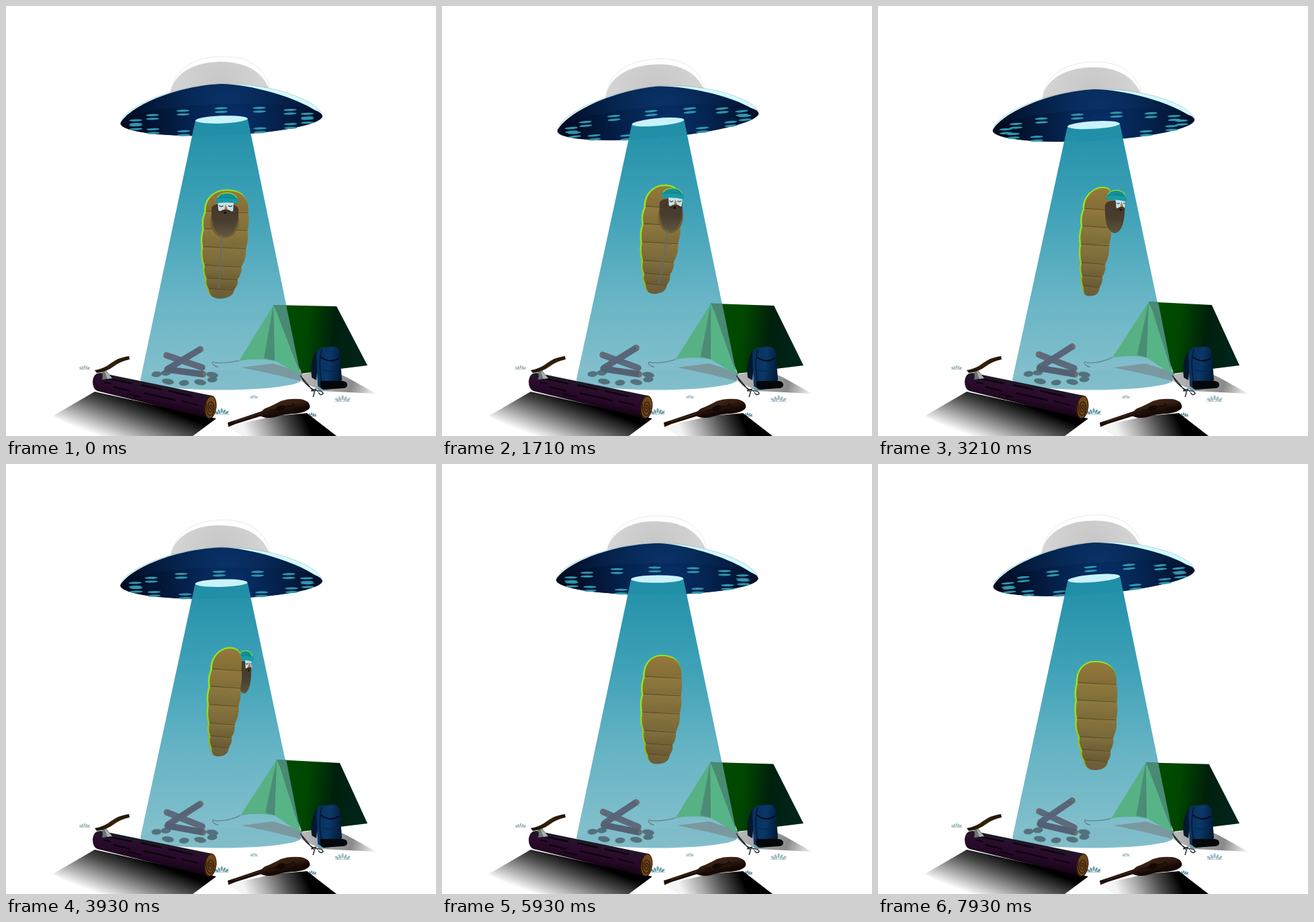
An HTML page with a canvas for the animation above (8000 ms loop, 640 by 640 pixels).

```html
<!DOCTYPE html>
<html lang="en">
<head>
<meta charset="utf-8">
<title>Camp abduction</title>
<style>
  html, body { margin: 0; width: 100%; height: 100%; overflow: hidden; background: #fff; }
  canvas { display: block; width: 640px; height: 640px; }
</style>
</head>
<body>
<canvas id="stage" width="640" height="640"></canvas>
<script>
const ctx = document.getElementById('stage').getContext('2d');
const LOOP = 8000, TAU = Math.PI * 2;

// ---------- helpers ----------
function paint(path, fill, stroke, width = 1) {
  const p = typeof path === 'string' ? new Path2D(path) : path;
  if (fill) { ctx.fillStyle = fill; ctx.fill(p); }
  if (stroke) { ctx.strokeStyle = stroke; ctx.lineWidth = width; ctx.stroke(p); }
}
function oval(x, y, rx, ry, fill, rot = 0) {
  ctx.beginPath();
  ctx.ellipse(x, y, rx, ry, rot, 0, TAU);
  ctx.fillStyle = fill;
  ctx.fill();
}
function addStops(g, colors) {
  colors.forEach((c, i) => g.addColorStop(i / (colors.length - 1), c));
  return g;
}
const linear = (x0, y0, x1, y1, ...colors) => addStops(ctx.createLinearGradient(x0, y0, x1, y1), colors);
const radial = (x, y, r, ...colors) => addStops(ctx.createRadialGradient(x, y, 0, x, y, r), colors);

// Smooth curve through values placed at the key times (seconds)
const KEY_TIMES = [0, 1, 2.5, 3.21, 4.57, 5.93, 7.93];
function track(v, t) {
  const k = KEY_TIMES, last = k.length - 1;
  let i = 0;
  while (i < last - 1 && t > k[i + 1]) i++;
  const slope = j => {
    const a = Math.max(0, j - 1), b = Math.min(last, j + 1);
    return (v[b] - v[a]) / (k[b] - k[a]);
  };
  const h = k[i + 1] - k[i], u = (t - k[i]) / h, u2 = u * u, u3 = u2 * u;
  return (2 * u3 - 3 * u2 + 1) * v[i] + (u3 - 2 * u2 + u) * h * slope(i)
       + (3 * u2 - 2 * u3) * v[i + 1] + (u3 - u2) * h * slope(i + 1);
}

// ---------- ground ----------
function tuft(x, y, s, color) {
  for (let i = -2; i <= 2; i++) {
    oval(x + i * 3.2 * s, y - (2 - Math.abs(i)) * 1.2 * s, 1.3 * s, 2.8 * s, color, i * 0.45);
  }
  ctx.fillStyle = color;
  ctx.fillRect(x - 9 * s, y + 1.5 * s, 18 * s, 0.8);
}

// The front stands in the beam, so its colours are already tinted
function tent(lift) {
  const px = 398 + 5 * lift, py = 445 - 5 * lift;
  const rx = 492 + 5 * lift, ry = 447 - 2 * lift;
  const lx = 347 + 2 * lift, ly = 528 - 5 * lift;
  const my = 526 - 5 * lift;
  paint('M438 549L480 540L508 553L551 577L470 573L440 559Z',
    linear(440, 550, 551, 577, '#b9b9b9', '#a2a2a2', '#8a8a8a', '#fafafa'));
  paint('M350 538L398 532L442 546L438 558L398 548Z', '#7a98a0');
  paint(`M${lx} ${ly}Q330 532 312 531M312 531q-6 -3 -4 2q3 4 8 4`, null, '#66838c', 1.3);
  paint(`M${px} ${py}L${lx} ${ly}Q${lx + 18} ${ly - 3} 384 ${my}L400 ${my + 2}Z`, '#57b184');
  paint(`M${px} ${py}L${384 + 2 * lift} ${my - 2}L400 ${my + 2}L${px + 2} ${py + 20}Z`, '#4b8c76');
  paint(`M${px} ${py}L${rx} ${ry}L538 535L440 547Z`, linear(410, 490, 525, 502, '#004c00', '#004600', '#00200c', '#00241a'));
  paint(`M${px} ${py}L417 ${py}L438.5 549L${px + 4} ${py + 10}Z`, '#4a8974');
  paint(`M${px} ${py}L400 ${my + 2}L438 549L${px + 6} ${py + 14}Z`, '#57b486');
}

function stick(x0, y0, x1, y1, color) {
  ctx.lineCap = 'round';
  paint(`M${x0} ${y0}L${x1} ${y1}`, null, color, 9.5);
  ctx.lineCap = 'butt';
  const a = Math.atan2(y1 - y0, x1 - x0);
  oval(x1 + 2 * Math.cos(a), y1 + 2 * Math.sin(a), 2.2, 4.2, '#706c66', a);
}

function campfire(k) {
  const stones = [[224, 548], [241, 559], [265, 561], [289, 560], [307, 556], [307, 549], [238, 546]];
  stones.forEach(([x, y], i) => oval(x, y - k, i % 2 ? 9 : 7.5, 4.2, '#52717c', i % 2 ? 0.15 : -0.1));
  stick(292, 538 + 3 * k, 239 + k, 520 - 3 * k, '#5c6a7c');
  stick(241 + k, 540 - 7 * k, 289, 511 - 10 * k, '#586579');
  stick(240 + k, 541 - 5 * k, 293, 548, '#546173');
}

function backpack() {
  paint('M463 513Q452 525 455 553L462 557L466 515Z', '#06182c');
  paint('M462 520Q462 507 476 508L487 507Q496 507 497 519L500 556Q499 563 488 563L473 571L464 566Z',
    linear(462, 530, 500, 535, '#08305f', '#0a3868', '#031a38'));
  paint('M468 522Q482 533 496 524', null, '#020f22', 2.2);
  paint('M470 511Q464 532 471 567', null, '#021630', 1.3);
  paint('M470 541Q484 547 498 540', null, '#06264a', 1);
  paint('M468 558h33q7 1 7 6t-8 5l-27 2q-7 -1 -5 -13Z', '#05070b');
  paint('M438 550L458 574M440 554Q450 570 464 573', null, '#20262a', 1.3);
  paint('M454 573l8 -3M460 572l-3 10M463 573q8 -1 9 4q-4 4 -7 -2', null, '#1b1f22', 1.4);
}

function bigLog() {
  paint('M132 574L70 610L128 640H278L313 614Z', linear(230, 598, 205, 665, '#000', '#4c4c4c', '#a5a5a5', '#fff'));
  paint('M141 546L304 579.5L303 614L136 573Q129 570 129 559Q130 546 141 546Z',
    linear(215, 556, 207, 598, '#142022', '#2b0d2d', '#250826', '#0b020b'));
  const bark = 'M150 554l38 8M201 564l31 7M242 573l36 8M160 567l25 6M205 576l48 11M146 560l10 2M262 588l24 6M180 577l20 5';
  paint(bark, null, '#080109', 1.8);
  oval(304, 597, 9.3, 17.5, '#2a1509', 0.12);
  oval(304.5, 597, 7.8, 15.8, '#6f471c', 0.12);
  ctx.beginPath();
  for (let a = 0; a < TAU * 2.6; a += 0.2) {
    const r = a / (TAU * 2.6);
    ctx.lineTo(304.5 + 6.5 * r * Math.cos(a), 598 + 13 * r * Math.sin(a));
  }
  ctx.strokeStyle = '#2b1608';
  ctx.lineWidth = 1.2;
  ctx.stroke();
  // axe
  paint('M140 541L148 541L158 554L143 556Q146 549 140 541Z', '#6c7773');
  paint('M146 541L158 554L151 555Z', '#a9b3af');
  paint('M132 542Q146 540 157 531Q168 523 183 521L184 526Q170 529 161 536Q149 545 135 546Z',
    linear(132, 540, 184, 522, '#1d1207', '#332108', '#241408'));
}

function guitar() {
  paint('M330 626L352 640H492L448 606L400 610Z', linear(445, 612, 362, 648, '#000', '#4e4e4e', '#a8a8a8', '#f4f4f4'));
  paint('M330 620L341 616.5L384 602L387 608L342 622L331 626.5Z', '#1d0f08');
  paint('M341 618.5L392 602', null, '#4a3020', 1.2);
  const body = 'M377 609Q380 600 392 596.5Q402 592 409 588Q421 583.5 438 585Q454 588 452 598Q447 606 426 607Q412 608 400 612Q385 615 377 609Z';
  paint(body, linear(410, 586, 416, 613, '#3f2416', '#341d12', '#170a05', '#120703'));
  oval(409, 598.5, 7, 4, '#120703', -0.3);
  paint('M426 591l7 7M392 603L428 594', null, '#170a05', 1.3);
}

// ---------- saucer and beam ----------
function beam(mouthX, mouthY, slope) {
  const dx = 39 * Math.cos(slope), dy = 39 * Math.sin(slope);
  paint(`M${mouthX - dx} ${mouthY - dy}L${mouthX + dx} ${mouthY + dy}L440 556A120 15.5 0 0 1 200 556Z`,
    linear(0, 170, 0, 571, 'rgba(32,143,168,1)', 'rgba(42,151,175,.9)', 'rgba(52,155,178,.74)', 'rgba(62,155,174,.62)'));
  oval(320, 556, 119, 14, 'rgba(110,175,190,.2)');
}

function saucer(t, mouthX, mouthY, slope) {
  ctx.save();
  ctx.translate(mouthX, mouthY);
  ctx.rotate(slope);
  paint('M-75 -38C-70 -78 -38 -94 2 -94C45 -94 72 -72 74 -38Z', '#fff', '#e4e4e4', 0.8);
  paint('M-75 -38C-72 -70 -40 -86 -4 -86C35 -86 62 -72 73 -42L73 -30H-75Z',
    radial(0, -50, 82, '#c6c6c6', '#cecece', '#d8d8d8'));
  const under = 'A150.5 23.5 0 0 1 -150.5 0Z';
  paint('M-150.5 0C-147 -22 -75 -53 0 -53C75 -53 147 -22 150.5 0' + under, '#d2fbff', 'rgba(21,50,63,.4)', 0.5);
  paint('M-150.5 1C-143 -20 -75 -52 0 -53C35 -53 118 -30 150.5 0' + under,
    radial(10, -22, 150, '#0a3268', '#072a59', '#041d42', '#020d24'));
  oval(0, 0, 150, 23.3, radial(15, 4, 150, '#07306a', '#052655', '#03183a', '#020c22'));
  for (let i = 0; i < 14; i++) {
    const a = i * TAU / 14 + t * 12.75 * Math.PI / 180;
    const x = 131 * Math.sin(a), y = -17 * Math.cos(a);
    for (const row of [0, 5.6]) oval(x, y + row, 9.8, 1.6, '#3096ad');
  }
  ctx.restore();
}

// ---------- sleeper ----------
const BAG = {
  top:    [273, 267, 266, 269, 276, 284, 293],
  apex:   [328, 329, 333, 334, 331, 327, 323],
  chest:  [327.5, 328.5, 327, 326, 328, 327.5, 324.5],
  foot:   [318, 317, 315, 315, 317, 320, 323],
  girth:  [1.08, 0.99, 0.81, 0.71, 0.82, 0.94, 0.99],
  head:   [326, 335, 347, 352.5, 353, 335, 325],
  beard:  [20, 18, 16, 14.5, 7.5, 8, 8],
  hat:    [329.5, 337.5, 350, 355, 355.5, 335, 325],
  brim:   [16.5, 16.5, 16, 15, 9, 8, 8],
  face:   [1, 5, 8, 10, 5, 0, 0],
  zip:    [317, 320, 326, 330, 332, 332, 332]
};
const SEAM_Y = [33, 59, 86, 113.5, 132.5, 148];
const SEAM_W = [30, 31, 30.5, 26, 22, 18.3];

// rim: how far the left and top edges are pulled in
function bagShape(b, rim) {
  const grow = rim ? 0.6 : 0;
  const rows = SEAM_Y.map((y, i) => {
    const c = b.chest + (b.foot - b.chest) * (y - 33) / 128;
    const w = SEAM_W[i] * b.girth;
    return { y: b.top + y, l: c - w + rim, r: c + w + grow };
  });
  const p = new Path2D(), top = b.top + rim * 0.8, first = rows[0], foot = b.top + 162 + grow;
  p.moveTo(first.l, first.y);
  p.bezierCurveTo(first.l - 1, top + 13, b.apex - 17 * b.girth, top, b.apex, top);
  p.bezierCurveTo(b.apex + 21 * b.girth, top, first.r + 2, top + 10, first.r, first.y + 2);
  for (let i = 1; i < rows.length; i++) {
    const a = rows[i - 1], c = rows[i];
    p.quadraticCurveTo(Math.max(a.r, c.r) + 2, (a.y + c.y) / 2, c.r, c.y + 2);
  }
  const end = rows[5];
  p.bezierCurveTo(end.r, foot - 4, b.foot + 9, foot, b.foot, foot);
  p.bezierCurveTo(b.foot - 9, foot, end.l + 1, foot - 4, end.l, end.y);
  for (let i = rows.length - 2; i >= 0; i--) {
    const a = rows[i + 1], c = rows[i];
    p.quadraticCurveTo(Math.min(a.l, c.l) - 2.5, (a.y + c.y) / 2, c.l, c.y);
  }
  p.closePath();
  return { p, rows };
}

function bag(b) {
  paint(bagShape(b, 0).p, linear(0, b.top, 0, b.top + 162, '#95e81c', '#93e021', '#8fae2c'));
  const { p, rows } = bagShape(b, 2.6);
  paint(p, linear(b.foot + 10, b.top, b.foot - 8, b.top + 162, '#96793a', '#8d7a40', '#85733f', '#6a5c38'));
  ctx.save();
  ctx.clip(p);
  rows.forEach((r, i) => {
    const h = i ? r.y - rows[i - 1].y : 30;
    ctx.fillStyle = linear(0, r.y - h, 0, r.y, 'rgba(60,45,15,0)', 'rgba(60,45,15,.16)');
    ctx.fillRect(r.l - 6, r.y - h, r.r - r.l + 12, h);
    paint(`M${r.l - 3} ${r.y - 1}Q${(r.l + r.r) / 2} ${r.y + 1} ${r.r + 3} ${r.y + 2}`, null, '#54451f', 0.9);
  });
  ctx.restore();
}

function face(x, y, w) {
  paint(`M${x - w} ${y + 17}H${x + w}L${x + w - 1} ${y + 32}Q${x + w * 0.5} ${y + 35} ${x} ${y + 31}Q${x - w * 0.5} ${y + 35} ${x - w + 1} ${y + 31}Z`, '#c9e1ea');
  paint(`M${x} ${y + 22}l3 9q-3 3 -5 -1Z`, '#b3753f');
  for (const s of [-1, 1]) {
    const ex = x + s * w * 0.56;
    paint(`M${ex - w * 0.25} ${y + 24}q${w * 0.25} 3 ${w * 0.5} 0`, null, '#253642', 1.1);
  }
  paint(`M${x - w * 0.7} ${y + 34}Q${x} ${y + 28} ${x + w * 0.7} ${y + 34}`, null, '#3c3023', 2.5);
  oval(x - 1, y + 34.5, w * 0.2, 1.8, '#17110d');
}

function sleeper(b) {
  const { head: x, beard: w, hat: hx, brim: hw, top: y } = b;
  paint(`M${x - w} ${y + 28}C${x - w} ${y + 18} ${x + w} ${y + 18} ${x + w} ${y + 30}
    C${x + w + 1} ${y + 54} ${x + w * 0.6} ${y + 69} ${x} ${y + 69}C${x - w * 0.7} ${y + 68} ${x - w - 1} ${y + 54} ${x - w} ${y + 28}Z`,
    linear(0, y + 22, 0, y + 70, '#47392a', '#483d2e', '#5f5540'));
  ctx.save();
  ctx.beginPath();
  ctx.rect(x - w, y, 2 * w + 0.5, 70);
  ctx.clip();
  face(x + b.face, y, Math.min(12, w * 0.62));
  ctx.restore();
  // knitted cap
  const tilt = b.face * 0.25;
  paint(`M${hx - hw + 2} ${y + 13}C${hx - hw + 3} ${y + 3} ${hx + hw - 4} ${y + 2} ${hx + hw - 2} ${y + 14}`, '#148d98', '#83d934', 1.3);
  paint(`M${hx - hw} ${y + 13 - tilt / 2}Q${hx} ${y + 10} ${hx + hw} ${y + 14 + tilt / 2}L${hx + hw - 0.5} ${y + 21 + tilt / 2}Q${hx} ${y + 18} ${hx - hw + 0.5} ${y + 21 - tilt / 2}Z`, '#179ba5');
  paint(`M${hx - hw + 2} ${y + 13}Q${hx} ${y + 11} ${hx + hw - 2} ${y + 14}`, null, '#0a7480', 0.8);
}

function floater(t) {
  const b = {};
  for (const name in BAG) b[name] = track(BAG[name], t);
  const facing = t < 3.9;
  if (!facing && t < 5.6) sleeper(b);
  bag(b);
  if (!facing) return;
  if (t < 3.1) {
    oval(b.head - 0.5, b.top + 47, b.beard + 1.5, 25, '#6f5c31');
    paint(`M${b.head - 5} ${b.top + 66}Q${b.head - 6} ${b.top + 90} ${b.zip} ${b.top + 148}`, null, '#616c6b', 1.8);
  }
  sleeper(b);
}

// ---------- scene ----------
function draw(ms) {
  const t = ms / 1000;
  const wave = Math.cos((t - 0.1) / 7 * TAU);
  const slope = -Math.atan((13 + 14 * Math.cos((t - 1.8) / 6.7 * TAU)) / 300);
  const mouthX = 320.2 - 14 * slope, mouthY = 173.2 - 4.2 * wave;

  ctx.fillStyle = '#fff';
  ctx.fillRect(0, 0, 640, 640);
  saucer(t, mouthX, mouthY, slope);
  beam(mouthX, mouthY, slope);
  oval(mouthX, mouthY, 39, 5.7, '#c9f2fc', slope);
  tent((1 - wave) / 2);
  campfire(t / 8);
  floater(t);

  tuft(117, 539, 0.9, '#a5b9be');
  tuft(369, 582, 0.65, '#a5bcc2');
  tuft(501, 586, 1.3, '#a3bcc3');
  tuft(472, 570, 1, '#5b9aa8');
  backpack();
  tuft(321, 605, 1.2, '#6d9eab');
  bigLog();
  tuft(455, 609, 0.8, '#5d8f9c');
  guitar();
}

function tick(now) {
  draw(now % LOOP);
  requestAnimationFrame(tick);
}
draw(0);
requestAnimationFrame(tick);
</script>
</body>
</html>
```
